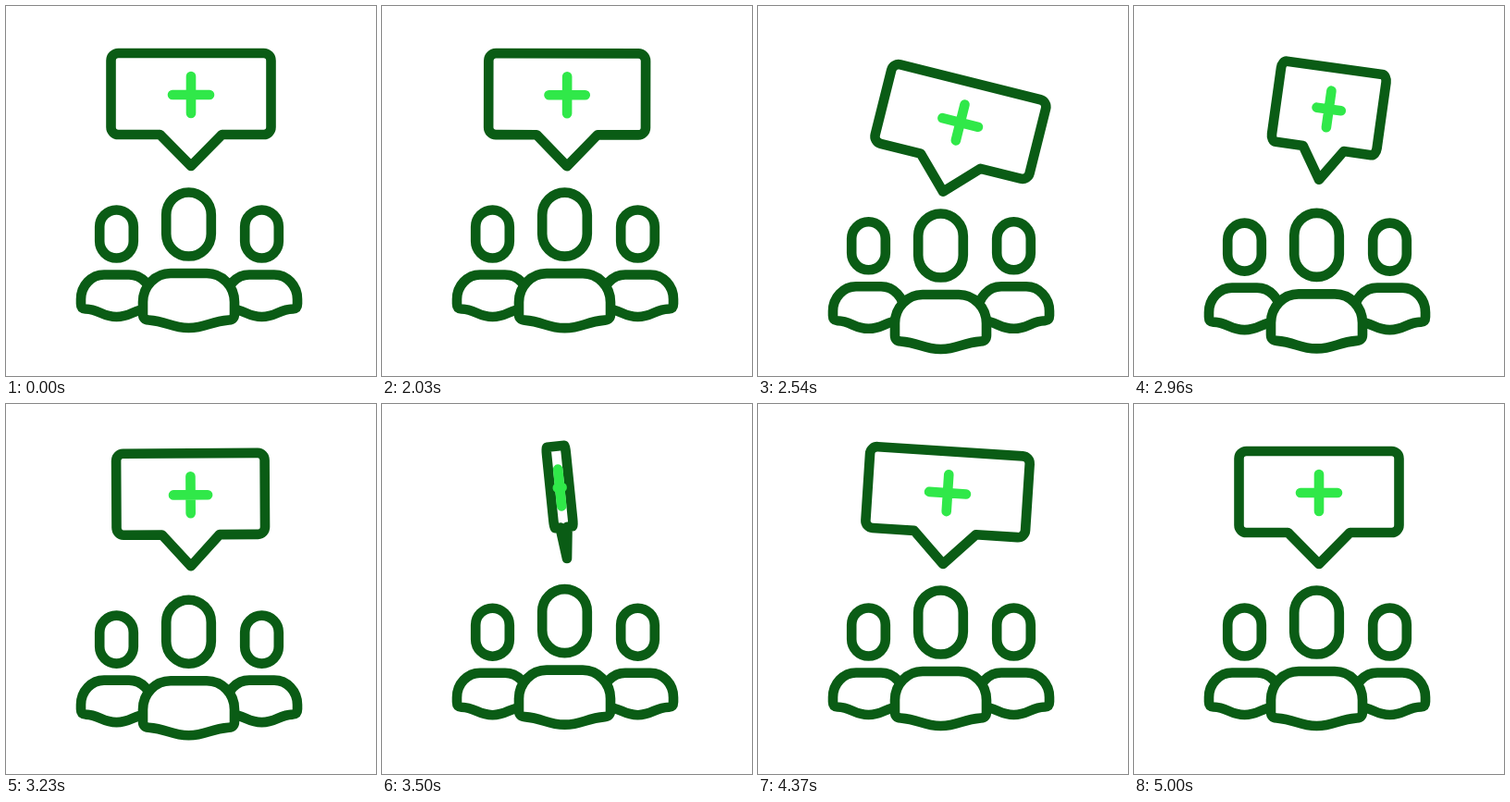
An HTML page that plays this animation: 400 by 400 pixels, repeating every 5.12 s.

```html
<!DOCTYPE html>
<html lang="en">
<head>
<meta charset="utf-8">
<title>Health talk</title>
<style>
  html, body { margin: 0; width: 100%; height: 100%; overflow: hidden; background: #fff; }
  svg { display: block; }
  path { vector-effect: non-scaling-stroke; }
</style>
</head>
<body>
<svg width="400" height="400" viewBox="0 0 400 400" fill="#fff" stroke="#0a5c15" stroke-width="10.6" stroke-linecap="round" stroke-linejoin="round">
  <defs>
    <g id="person">
      <rect x="101.200" y="220.500" width="36.600" height="52" rx="18.300"/>
      <path d="M81 322V317A25 26.500 0 0 1 106 290.500H133A25 26.500 0 0 1 158 317V322Q158 327 153 327.500C138 328 135 336 119.500 336S101 328 86 327.500Q81 327 81 322Z"/>
    </g>
  </defs>
  <g id="sides">
    <use href="#person"/>
    <use href="#person" x="157"/>
  </g>
  <g id="leader">
    <rect x="173.200" y="201.500" width="48.600" height="69" rx="24.300"/>
    <path d="M148 333V320A30 31 0 0 1 178 289H217A30 31 0 0 1 247 320V333Q247 339 241 339.500C220 341 217 348 197.500 348S175 341 154 339.500Q148 339 148 333Z"/>
  </g>
  <!-- Bubble coordinates are relative to the tip of its tail. -->
  <g id="bubble">
    <path d="M0 0L-33.500-34H-78.500a8 8 0 0 1-8-8V-114a8 8 0 0 1 8-8H78.500a8 8 0 0 1 8 8V-42a8 8 0 0 1-8 8H33.500Z"/>
    <path stroke="#30e849" d="M-20-77H20M0-97V-57"/>
  </g>
</svg>
<script>
const LOOP = 5120, START = 2000, END = 3000, STEP = 30;

// Sine-eased swing through its turning points, each [ms, value].
function swing(t, ...turns) {
  const next = turns.findIndex(([time]) => time > t);
  if (next < 0) return turns.at(-1)[1];
  if (next === 0) return turns[0][1];
  const [t0, v0] = turns[next - 1], [t1, v1] = turns[next];
  return v0 + (v1 - v0) * (1 - Math.cos(Math.PI * (t - t0) / (t1 - t0))) / 2;
}

const tilt = t => swing(t, [0, 0], [580, 14.2], [1600, -6.3], [2240, 4], [END, 0]);
const drop = t => swing(t, [0, 0], [470, 28], [1630, -7], [2200, 0]);
const nod = t => swing(t, [0, 0], [600, 23.6], [840, 24], [1600, -2.5], [2300, 0]);

// One and a half turns about the vertical axis, slowing to a stop.
const spin = t => 3 * Math.PI * (1 - Math.max(0, 1 - t / 2200) ** 1.5);

function place(id, x, y, rest = "") {
  document.getElementById(id).setAttribute("transform", `translate(${x} ${y}) ${rest}`);
}

function draw() {
  const elapsed = performance.now() % LOOP - START;
  const t = Math.min(END, Math.max(0, Math.floor(elapsed / STEP) * STEP));
  const width = Math.max(.001, Math.abs(Math.cos(spin(t))));
  place("sides", 0, .6 * nod(t - 60));
  place("leader", 0, nod(t));
  place("bubble", 200, 173 + drop(t), `rotate(${tilt(t)}) scale(${width} 1)`);
  requestAnimationFrame(draw);
}
draw();
</script>
</body>
</html>
```
